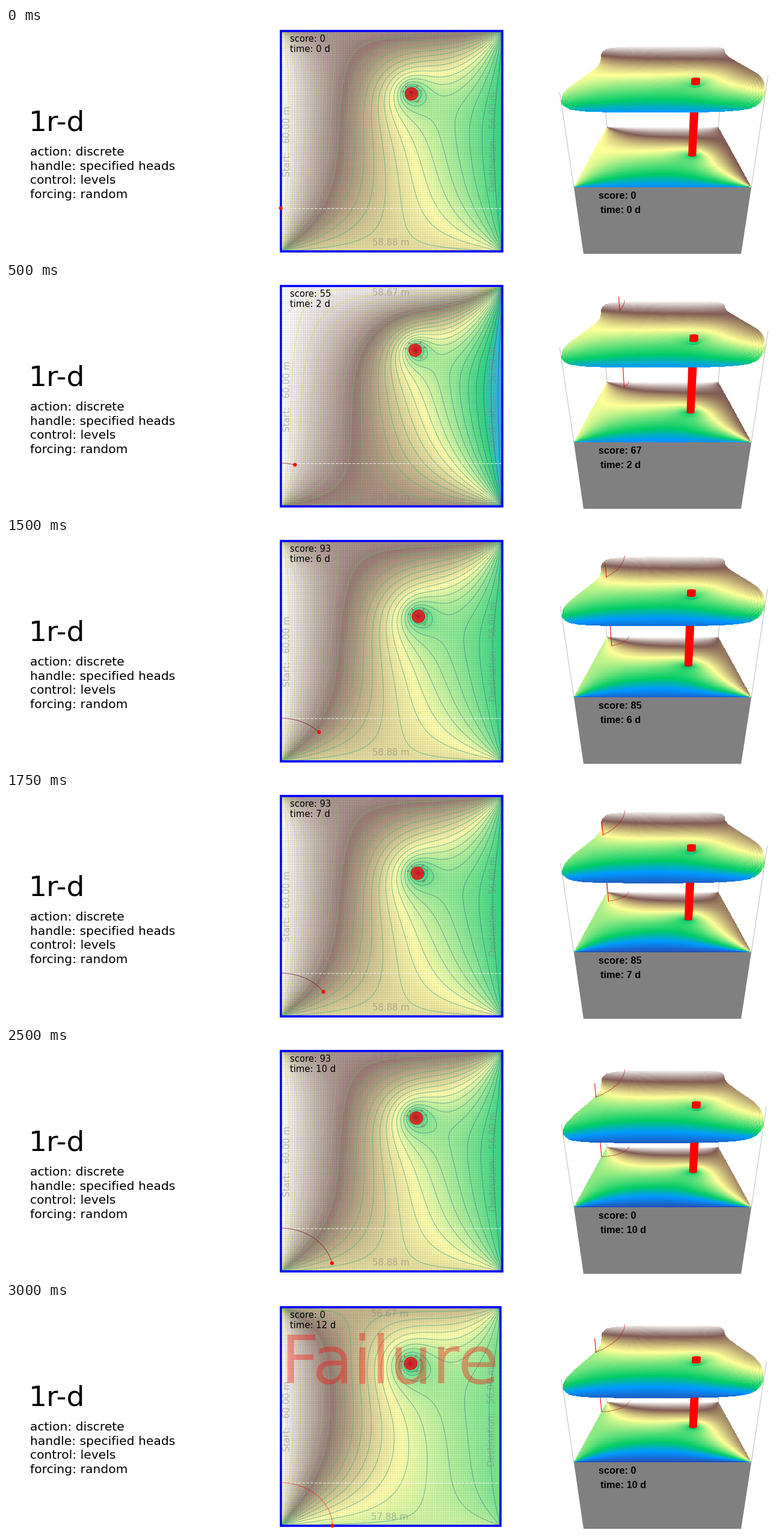
These frames come from a looping animation (1280 by 379 pixels, 3250 ms). A matplotlib script:

```python
import numpy as np
import matplotlib.pyplot as plt
from matplotlib.animation import FuncAnimation
from matplotlib.colors import Normalize
from matplotlib.patches import Circle, Ellipse, Polygon, Rectangle

W, H, DPI = 1280, 379, 64
PT = 72 / DPI
LAST = 12         # final day on the map
LAST_BLOCK = 10   # final day in the block view
N = 100           # cells per side
LEFT, RIGHT, GAP = 60.0, 56.0, 1.21
TERRAIN = plt.get_cmap("terrain")

# key days, and on them the forcing steps and both wells as (u, v)
KEY = [0, 2, 4, 7, 9, 10, 12]
STEP = [0, 2, 1, 0, 1, 0, -2]
MAP_WELL = ([.590, .606, .630, .617, .598, .611, .592],
            [.285, .291, .326, .350, .315, .304, .258])
BLOCK_WELL = ([.590, .619, .628, .571, .532, .532, .532],
              [.293, .307, .324, .317, .303, .281, .281])


def keyed(values, day):
    return np.interp(day, KEY, values)


def track(t):
    """Particle position as fractions of the map, bending to the lower edge."""
    a = np.pi * t / 23
    return .236 * np.sin(a), np.minimum(1, .803 + .2 * (1 - np.cos(a)))


def score(day, best, span, power, last):
    if day >= last:
        return 0
    return round(best * (1 - max(0, 1 - day / span) ** power))


# --- groundwater heads -------------------------------------------------
M = N - 1
LAM, VEC = np.linalg.eigh(2 * np.eye(M) - np.eye(M, k=1) - np.eye(M, k=-1))
LAM2 = LAM[:, None] + LAM[None, :]


def solve(rhs):
    return VEC @ ((VEC.T @ rhs @ VEC) / LAM2) @ VEC.T


def node(u, v):
    return int(round((1 - v) * N)), int(round(u * N))


def heads(south, u, v, low):
    """Steady heads on the nodes with a point sink pulled down to `low`."""
    north = south + GAP
    rhs = np.zeros((M, M))
    rhs[:, 0] += LEFT
    rhs[:, -1] += RIGHT
    rhs[0] += south
    rhs[-1] += north
    base = solve(rhs)
    j, i = np.array(node(u, v)) - 1
    sink = np.zeros((M, M))
    sink[j, i] = 1
    g = solve(sink)
    h = np.empty((N + 1, N + 1))
    h[1:-1, 1:-1] = base - g * (base[j, i] - low) / g[j, i]
    h[:, 0], h[:, -1], h[0], h[-1] = LEFT, RIGHT, south, north
    for row, side in ((0, south), (-1, north)):
        h[row, 0], h[row, -1] = (LEFT + side) / 2, (RIGHT + side) / 2
    return h


def cells(h):
    return (h[1:, 1:] + h[:-1, 1:] + h[1:, :-1] + h[:-1, :-1]) / 4


# --- drawing helpers ---------------------------------------------------
fig = plt.figure(figsize=(W / DPI, H / DPI), dpi=DPI, facecolor="white")
ax = fig.add_axes([0, 0, 1, 1])


def put(x, y, s, px, color="black", font="DejaVu Sans", **kw):
    ax.text(x, y, s, fontsize=px * PT, color=color, family=font,
            zorder=1, **kw)


def line(x, y, color, px=1.0, **kw):
    ax.plot(x, y, color=color, lw=px * PT, zorder=1, **kw)


def shape(patch):
    patch.set_zorder(1)
    ax.add_patch(patch)


def fill(points, color):
    shape(Polygon(points, closed=True, fc=color, ec="none"))


def column(foot, r0, top, r1):
    """Red cylinder between a lower and an upper rim."""
    (x0, y0), (x1, y1) = foot, top
    fill([(x0 - r0, y0), (x1 - r1, y1), (x1 + r1, y1), (x0 + r0, y0)], "red")
    for x, y, r in ((x0, y0, r0), (x1, y1, r1)):
        shape(Ellipse((x, y), 2 * r, 3.5, fc="red", ec="none"))


def titles():
    put(38, 172, "1r-d", 47.3)
    rows = ["action: discrete", "handle: specified heads",
            "control: levels", "forcing: random"]
    for k, s in enumerate(rows):
        put(39.7, 213.3 + 23.4 * k, s, 20.2)


# --- map view ----------------------------------------------------------
def draw_map(day):
    failed = day == LAST
    x0, y0, size = (456.5, 6.7, 365.2) if failed else (456.8, 5.0, 368.3)
    x1, y1 = x0 + size, y0 + size

    def at(u, v):
        return x0 + u * size, y0 + v * size

    rise = .5 * np.rint(keyed(STEP, day))
    south = 57.67 + rise
    low = 54.67 + .62 * rise
    u, v = (keyed(c, day) for c in MAP_WELL)
    h = heads(south, u, v, low)

    rgb = TERRAIN((cells(h) - low) / (LEFT - low))[::-1, :, :3]
    ax.imshow(.8 * rgb + .2, extent=(x0, x1, y1, y0), aspect="auto",
              interpolation="nearest", zorder=1)
    ticks = np.linspace(0, 1, N + 1) * size
    grid = dict(color="black", lw=.5 * PT, alpha=.1, zorder=1)
    ax.vlines(x0 + ticks, y0, y1, **grid)
    ax.hlines(y0 + ticks, x0, x1, **grid)
    ax.contour(x0 + ticks, y1 - ticks, h, levels=np.linspace(low, LEFT, 30),
               cmap="viridis", linewidths=.95 * PT, alpha=.6, zorder=1)

    line(*at(np.array([0, 1]), np.full(2, .803)), "white", 1.2, alpha=.75,
         ls=(0, (4, 1.8)))
    shape(Rectangle((x0, y0), size, size, fill=False, ec="blue", lw=3.6 * PT))

    faint = dict(color="gray", alpha=.5, ha="center", va="center")
    put(*at(.497, .031), f"{south:.2f} m", 14.85, **faint)
    put(*at(.497, .961), f"{south + GAP:.2f} m", 14.85, **faint)
    put(*at(.029, .5), f"Start:   {LEFT:.2f} m", 14.85, rotation=90, **faint)
    put(*at(.961, .5), f"Destination:   {RIGHT:.2f} m", 14.85, rotation=90,
        **faint)

    wx, wy = at(u, v)
    shape(Circle((wx, wy), 10.3, fc=(1, 0, 0, .72), ec=(.9, .08, .1),
                 lw=1.5 * PT))
    label = f"{low:.2f} m"
    for ch, deg in zip(label, np.linspace(165, -50, len(label))):
        a = np.radians(deg)
        put(wx + 14.5 * np.cos(a), wy - 14.5 * np.sin(a), ch, 6, "#c02020",
            rotation=deg - 90, ha="center", va="center", alpha=.85)

    px, py = at(*track(np.linspace(0, day, 60)))
    color, alpha = ("red", .5) if failed else ("#7a1818", .7)
    line(px, py, color, 1.1, alpha=alpha)
    shape(Circle((px[-1], py[-1]), 3.1, fc="red", ec="none"))

    if failed:
        put(456, 134, "Failure", 110.5, "red", alpha=.34)
    put(472.5, y0 + 18, f"score: {score(day, 93, 6, 2.22, LAST)}", 14.75)
    put(472.5, y0 + 35, f"time: {day} d", 14.75)


# --- block view --------------------------------------------------------
def project(x, depth, z):
    w = 1 + .595 * depth - .126 * z
    return 1091.5 + 295 * x / w, 1256 - (990 + 750 * depth) / w


def draw_block(day):
    day = min(day, LAST_BLOCK)
    front = np.interp(day, [4, 7], [.13, .04])  # colour value of the front
    low = (RIGHT - LEFT * front) / (1 - front)
    south = 57.67 - .02 * day
    u, v = (keyed(c, day) for c in BLOCK_WELL)
    h = heads(south, u, v, low)
    sink = .06 * (day / LAST_BLOCK) ** 6

    def level(head):
        return .8 + .6 * (head - low) / (LEFT - low) - sink

    def sheet(grid, z):
        n = len(grid)
        across, depth = np.meshgrid(np.linspace(-.5, .5, n),
                                    np.linspace(1, 0, n))
        ax.pcolormesh(*project(across, depth, z), cells(grid), cmap=TERRAIN,
                      norm=Normalize(low, LEFT), shading="flat",
                      antialiased=False, zorder=1)

    fill([(944, 266), (1239, 266), (1222, 377), (960, 377)], "#808080")
    sheet(h.T, 0)

    for x, head in ((-.5, south), (.5, south + GAP)):
        for d in (0, 1):
            line(*project(x, d, np.array([0, level(head)])), "#b4b4b4", .9)

    # same track as on the map, but run through faster
    tu, tv = track(np.linspace(0, 12 * (day / LAST_BLOCK) ** .7, 60))
    x, d = .5 - tv, 1 - tu
    z = np.array([level(h[node(*p)]) for p in zip(tu, tv)])

    def trail(z, mark):
        if day:
            line(*project(x, d, z), "#b01818", .9, alpha=.7)
            line(*project(x[-1], d[-1], np.array(mark)), "red", 1.1)

    # head just beside the well carries the cap
    j, i = node(u, v)
    rim = level(h[j, i - 4])
    foot, mid, top = (project(.5 - v, 1 - u, k) for k in (0, rim, rim + .07))

    trail(0 * z, [0, z[-1]])
    column(foot, 6.5, mid, 7.5)
    # the upper sheet leaves out the outermost nodes, which rounds its corners
    inner = h.T[2:-2, 2:-2]
    sheet(inner, level(inner))
    column(mid, 7.3, top, 7.3)
    trail(z, [z[-1], z[-1] + .2])

    bold = dict(font="Liberation Sans", weight="bold")
    put(985, 285, f"score: {score(day, 85, 5, 3, LAST_BLOCK)}", 16.4, **bold)
    put(988.5, 309, f"time: {day} d", 16.4, **bold)


def draw(day):
    ax.clear()
    titles()
    draw_map(day)
    draw_block(day)
    ax.set_xlim(0, W)
    ax.set_ylim(H, 0)
    ax.axis("off")


anim = FuncAnimation(fig, draw, frames=LAST + 1, interval=250, repeat=True,
                     repeat_delay=0, init_func=lambda: None)
plt.show()
```
